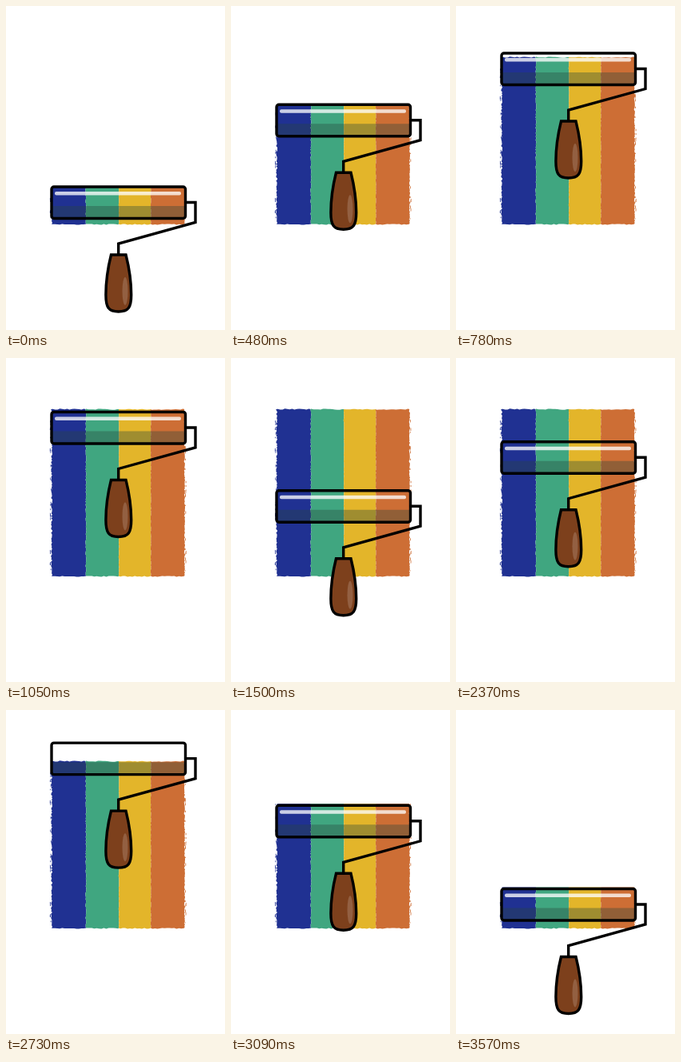
Recreate the animation shown at these times as an HTML page with a canvas. Size 274 px wide and 405 px high, loop 3600 ms.

```html
<!DOCTYPE html>
<html lang="en">
<head>
<meta charset="utf-8">
<title>Paint roller</title>
<style>
  html, body { margin: 0; width: 100%; height: 100%; overflow: hidden; background: #fff; }
  canvas { display: block; width: 274px; height: 405px; }
</style>
</head>
<body>
<canvas id="stage"></canvas>
<script>
const W = 274, H = 405, LOOP = 3600, STEP = 30;
const PAINT_TOP = 64, PAINT_BOTTOM = 273, ROLLER_TOP = 226;
const canvas = document.getElementById('stage');
const ctx = canvas.getContext('2d');
const ratio = window.devicePixelRatio || 1;
canvas.width = W * ratio;
canvas.height = H * ratio;

// Time in ms and how far the roller is lifted.
const liftKeys = [[0, 0], [897, 192], [1785, -2], [1800, -2], [2697, 192], [3570, 2.5], [3600, 0]];
const PAINTED = 897, UNPAINT = 2697;

function liftAt(t) {
  const i = liftKeys.findIndex(key => t < key[0]);
  const [t0, a] = liftKeys[i - 1], [t1, b] = liftKeys[i];
  return a + (b - a) * (t - t0) / (t1 - t0);
}

let seed = 17;
function random() {
  seed = (seed * 16807) % 2147483647;
  return seed / 2147483647;
}
const jitter = size => (random() - 0.5) * 2 * size;

function roughEdge(x, size) {
  const points = [];
  for (let y = PAINT_TOP; y <= PAINT_BOTTOM; y += 1.5) points.push([x + jitter(size), y]);
  return points;
}

function roughStripe(left, right) {
  const path = new Path2D();
  const x0 = left[0][0], x1 = right[0][0];
  left.forEach(p => path.lineTo(...p));
  for (let x = x0 + 2; x < x1; x += 3) path.lineTo(x, PAINT_BOTTOM + jitter(0.6));
  [...right].reverse().forEach(p => path.lineTo(...p));
  for (let x = x1 - 2; x > x0; x -= 3) path.lineTo(x, PAINT_TOP + jitter(0.7));
  path.closePath();
  return path;
}

function addSpecks(path, x, count) {
  for (let i = 0; i < count; i++) {
    const y = PAINT_TOP + random() * (PAINT_BOTTOM - PAINT_TOP - 4);
    path.rect(x + jitter(0.6), y, 0.8, 1 + random() * 3);
  }
}

const edges = [[57.2, 0.9], [100, 0.6], [141.2, 0.35], [181.2, 0.35], [223.4, 0.7]]
  .map(([x, size]) => roughEdge(x, size));
const stripes = ['#203192', '#40a680', '#e3b52a', '#cd6e35'].map((color, i) => ({
  color, path: roughStripe(edges[i], edges[i + 1])
}));
addSpecks(stripes[0].path, 55.4, 24);
addSpecks(stripes[3].path, 224.2, 24);

const body = new Path2D();
body.roundRect(57, 226, 167.5, 39.5, 3);
const shade = new Path2D('M58 250H223.5V265H58Z');
const shine = new Path2D();
shine.roundRect(61, 232, 158, 4.5, 2);
const wire = new Path2D('M225 245.5H237V270.5L140.7 297V311');
const handle = new Path2D('M131.5 311H150C153.5 325 156.7 345 156.7 361C156.7 377 153 382 140.7 382C128.5 382 124.9 377 124.9 361C124.9 345 128 325 131.5 311Z');
const handleShine = new Path2D();
handleShine.ellipse(149, 356.5, 3.5, 17.5, 0, 0, Math.PI * 2);

function fill(path, color) {
  ctx.fillStyle = color;
  ctx.fill(path);
}

function drawPaint(top) {
  ctx.save();
  ctx.beginPath();
  ctx.rect(0, top, W, H - top);
  ctx.clip();
  stripes.forEach(({ path, color }) => fill(path, color));
  ctx.restore();
}

function drawRoller(lift) {
  ctx.save();
  ctx.translate(0, -lift);
  ctx.strokeStyle = '#000';
  ctx.lineWidth = 3.4;
  fill(shade, 'rgba(40,70,60,0.36)');
  fill(shine, 'rgba(255,255,255,0.77)');
  ctx.stroke(body);
  ctx.stroke(wire);
  fill(handle, '#7d401c');
  fill(handleShine, 'rgba(255,255,255,0.17)');
  ctx.stroke(handle);
  ctx.restore();
}

function render() {
  const t = Math.floor((performance.now() % LOOP) / STEP) * STEP;
  const lift = liftAt(t);
  const covered = t >= PAINTED && t <= UNPAINT;
  const edge = ROLLER_TOP - lift + (t > UNPAINT ? -2 : 0);
  ctx.setTransform(ratio, 0, 0, ratio, 0, 0);
  ctx.fillStyle = '#fff';
  ctx.fillRect(0, 0, W, H);
  drawPaint(covered ? 0 : edge);
  drawRoller(lift);
  requestAnimationFrame(render);
}
render();
</script>
</body>
</html>
```
